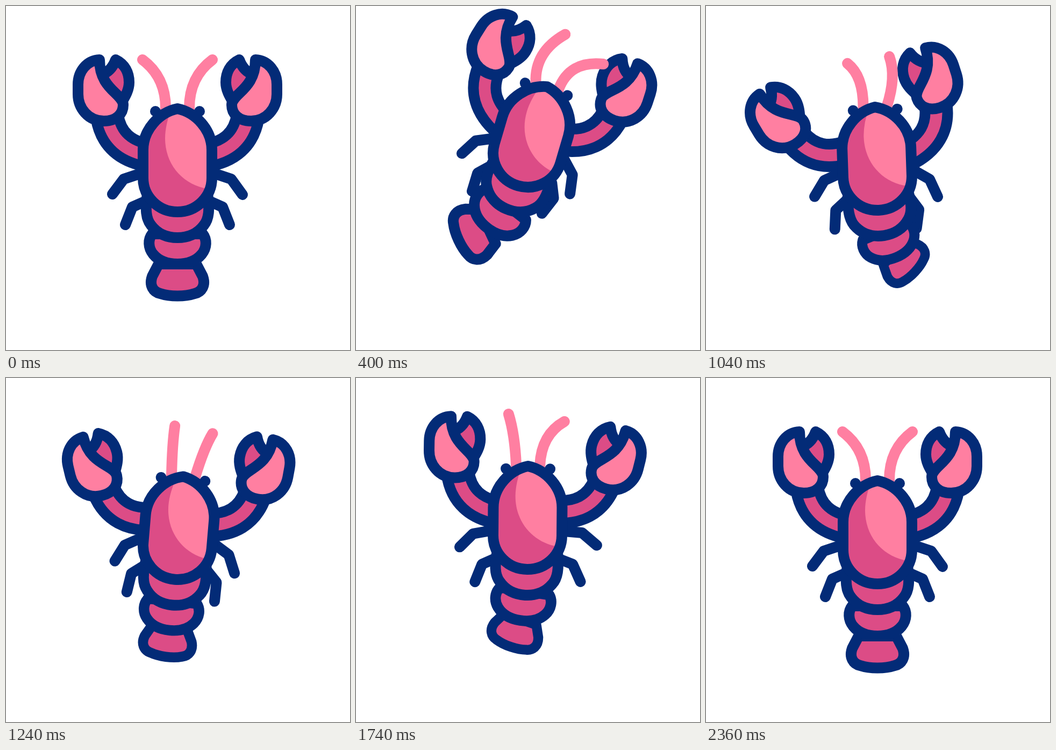
An HTML page that plays this animation: 640 by 640 pixels, repeating every 2400 ms.

```html
<!DOCTYPE html>
<html lang="en">
<head>
<meta charset="utf-8">
<title>Swimming lobster</title>
<style>
html, body { margin: 0; width: 100%; height: 100%; overflow: hidden; background: #fff; }
svg { display: block; width: 100%; height: 100%; }
.line { fill: none; stroke: #032b77; stroke-width: 20; stroke-linecap: round; stroke-linejoin: round; }
.dark { fill: #dc4c86; }
.light { fill: #ff7fa1; }
.sleeve { fill: none; stroke: #032b77; stroke-width: 62; }
.flesh { fill: none; stroke: #dc4c86; stroke-width: 22; }
.feeler { fill: none; stroke: #ff7fa1; stroke-width: 20; stroke-linecap: round; }
</style>
</head>
<body>
<svg viewBox="0 0 640 640">
  <defs>
    <path id="armPath" d="M188 205Q198 269 270 279"/>
    <path id="thumb" d="M204 100C221 108 229 124 229 142C229 156 222 168 216 178C200 160 185 150 177 128Q196 122 204 100Z"/>
    <path id="claw" d="M174 100C150 101 134 122 134 146V164C134 190 153 214 182 214C206 214 218 200 218 184C218 163 174 155 174 100Z"/>
    <path id="shell" d="M319 191C285 198 255 230 255 268V320A64 63 0 0 0 383 320V268C383 230 353 198 319 191Z"/>
  </defs>
  <g id="lobster">
    <g id="armL"></g>
    <g transform="translate(638) scale(-1 1)"><g id="armR"></g></g>
    <path id="feelerL" class="feeler"/>
    <path id="feelerR" class="feeler"/>
    <g class="line">
      <path id="legUL" d="M198 350L219 322L252 311"/>
      <path id="legUR" d="M440 351L419 322L386 311"/>
      <path id="legLL" d="M222 407L235 374L262 362"/>
      <path id="legLR" d="M416 407L403 374L376 362"/>
    </g>
    <g id="seg1">
      <g id="seg2">
        <g id="fan">
          <path class="line dark" d="M284 480L272 503C266 520 274 532 287 535C305 541 333 541 351 535C364 532 372 520 366 503L354 480Z"/>
        </g>
        <path class="line dark" d="M272 424C264 434 264 450 274 462C284 474 300 480 319 480C338 480 354 474 364 462C374 450 374 434 366 424Z"/>
      </g>
      <path class="line dark" d="M263 350C259 378 260 396 270 408C282 424 300 431 319 431C338 431 356 424 368 408C378 396 379 378 375 350Z"/>
    </g>
    <circle cx="278" cy="196" r="10" fill="#032b77"/>
    <circle cx="360" cy="196" r="10" fill="#032b77"/>
    <use href="#shell" class="dark"/>
    <path class="light" d="M308 190Q296 222 296 246C296 296 330 333 375 340L383 320V268C383 230 353 198 319 191Z"/>
    <use href="#shell" class="line"/>
  </g>
</svg>
<style>
.line.dark { fill: #dc4c86; }
.line.light { fill: #ff7fa1; }
</style>
<script>
const LOOP = 2400, REST_AT = 2360;
const POSES = [400, 720, 1040, 1460, 1740];
const $ = id => document.getElementById(id);

for (const side of 'LR') {
  $('arm' + side).innerHTML =
    '<use href="#armPath" class="sleeve"/><use href="#armPath" class="flesh"/>' +
    `<use id="thumb${side}" href="#thumb" class="line dark"/>` +
    '<use href="#claw" class="line light"/>';
}

// Smooth curve through the poses: flat at turning points, no overshoot.
function track(rest, values, extra = {}) {
  const keys = [[0, rest], [REST_AT, rest], [LOOP, rest]];
  POSES.forEach((t, i) => keys.push([t, values[i]]));
  for (const t in extra) keys.push([+t, extra[t]]);
  keys.sort((a, b) => a[0] - b[0]);
  const rate = i => (keys[i + 1][1] - keys[i][1]) / (keys[i + 1][0] - keys[i][0]);
  const slope = keys.map((k, i) => {
    if (i === 0 || i === keys.length - 1) return 0;
    const a = rate(i - 1), b = rate(i);
    return a * b > 0 ? 2 * a * b / (a + b) : 0;
  });
  return t => {
    let i = 0;
    while (i < keys.length - 2 && t >= keys[i + 1][0]) i++;
    const [t0, a] = keys[i], [t1, b] = keys[i + 1];
    const h = t1 - t0, u = (t - t0) / h, v = 1 - u;
    return v * v * (1 + 2 * u) * a + u * u * (3 - 2 * u) * b +
      h * u * v * (v * slope[i] - u * slope[i + 1]);
  };
}

const rise = track(0, [-46, -55.5, -3, -14, -27], { 570: -67, 1240: -8, 1660: -28, 2160: -1 });
const tilt = track(0, [16.4, -1, -2, 9, 0.5], { 880: -8, 1930: -3, 2160: -1 });
const bend = track(0, [1, -0.95, -0.93, 0.97, 0.38], { 880: -1.1, 1930: -0.3, 2160: -0.1 });
const size2 = track(1, [1, 0.95, 0.95, 1, 0.985]);
const size3 = track(1, [1, 0.937, 0.92, 1, 0.925]);
const tuck = track(0, [-2, -9, -9, -2, -2]);
const armL = track(0, [15.7, -4, -29, -0.6, 0.4], { 1070: -30, 1980: -5, 2180: -2.5 });
const armR = track(0, [1.6, -7.2, -16, 30, 13.7]);
const snapL = track(0, [0, 0, 4, 0, 0], { 970: 0, 1120: 15, 1260: 0 });
const snapR = track(0, [0, 0, 0, 15, 0.5], { 1310: 0, 1610: 0 });
const legs = [
  ['legUL', 250, 311, track(0, [-5.6, 9, -4, -13, 8])],
  ['legUR', 388, 311, track(0, [27, 9, 13, 14, -14])],
  ['legLL', 258, 363, track(0, [-21, 24, -17, -5, 0])],
  ['legLR', 380, 363, track(0, [43, -1, 31, 8, -3])]
];
// Each feeler: base x, tip offset from the base, lean at the base.
const feelers = [
  ['feelerL', 297, track(-43, [27, -4, -26.6, 26.8, -15]),
    track(-90, [-102, -91, -82, -102.7, -95.7]), track(0, [-19, -7, 2, -10, -3])],
  ['feelerR', 341, track(43, [66.7, 30.7, 7.8, 46, 45]),
    track(-90, [-69, -82.6, -92, -74, -82.6]), track(0, [4, 24, 20, 4, 2])]
];

const set = (id, value) => $(id).setAttribute('transform', value);
const turn = (a, x, y) => `rotate(${a.toFixed(3)} ${x} ${y})`;
const joint = (a, y, k, slide = 0) =>
  `translate(319 ${y + slide}) rotate(${a.toFixed(3)}) scale(${k.toFixed(4)}) translate(-319 ${-y})`;

function draw(t) {
  set('lobster', `translate(0 ${rise(t).toFixed(3)}) ${turn(tilt(t), 319, 320)}`);
  set('armL', turn(armL(t), 254, 262));
  set('armR', turn(-armR(t), 254, 262));
  set('thumbL', turn(-snapL(t), 199, 192));
  set('thumbR', turn(-snapR(t), 199, 192));
  const b = bend(t);
  set('seg1', joint(7.5 * b, 360, 1));
  set('seg2', joint(14 * b, 410, size2(t)));
  set('fan', joint(27 * b, 477, size3(t), tuck(t)));
  for (const [id, x, y, angle] of legs) set(id, turn(angle(t), x, y));
  for (const [id, x, dx, dy, lean] of feelers) {
    const a = lean(t) * Math.PI / 180;
    const cx = x + 58 * Math.sin(a), cy = 190 - 58 * Math.cos(a);
    $(id).setAttribute('d', `M${x} 192L${x} 190Q${cx} ${cy} ${x + dx(t)} ${190 + dy(t)}`);
  }
}

function frame(now) {
  draw(now % LOOP);
  requestAnimationFrame(frame);
}
draw(0);
requestAnimationFrame(frame);
</script>
</body>
</html>
```
